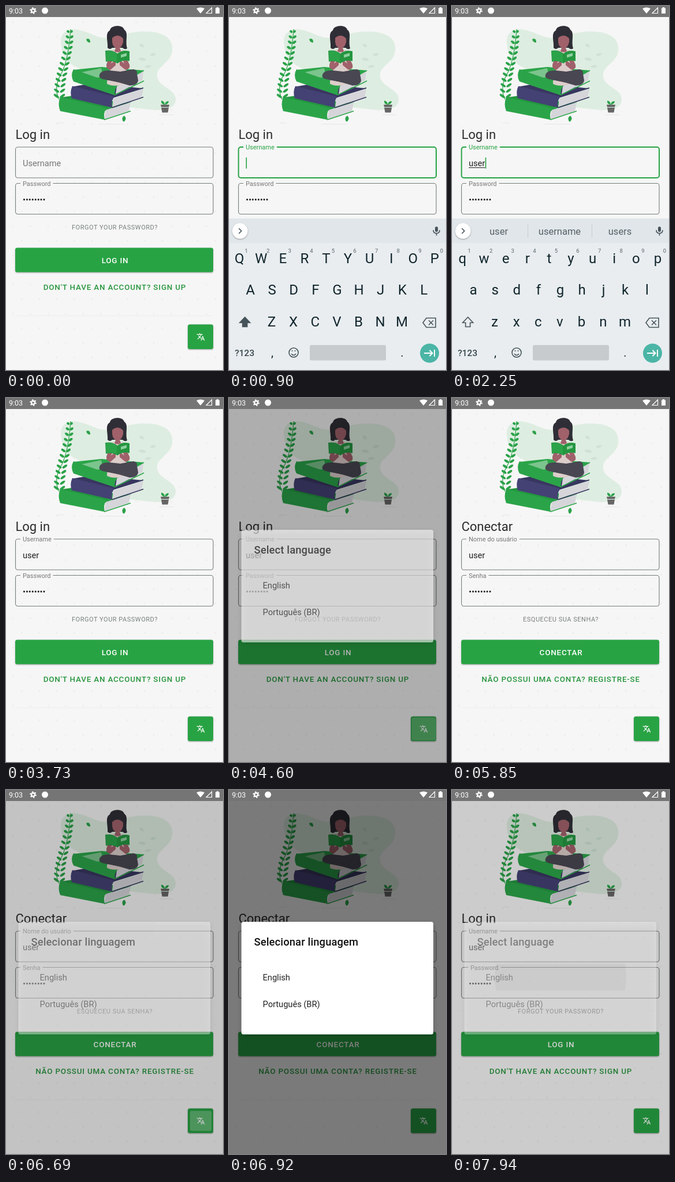
An HTML page that plays this animation: 376 by 627 pixels, repeating every 7990 ms.

```html
<!DOCTYPE html>
<html lang="en">
<head>
<meta charset="utf-8">
<title>Login and language</title>
<style>
html, body { margin: 0; width: 100%; height: 100%; overflow: hidden; background: #f6f6f6; }
svg { display: block; width: 100%; height: 100%; }
text { font-family: Roboto, "Noto Sans", sans-serif; white-space: pre; }
.center { text-anchor: middle; }
.body { font-size: 14.63px; fill: #222; }
.label { fill: #777; }
.button { font-size: 13.4px; font-weight: 500; letter-spacing: .82px; text-anchor: middle; }
.key { font-size: 24px; fill: #10252c; text-anchor: middle; }
.digit { font-size: 9.5px; fill: #59656a; text-anchor: middle; }
.hint { font-size: 16.5px; fill: #546066; text-anchor: middle; }
.line { fill: none; stroke: #46545a; stroke-width: 1.6; }
.shadow { filter: drop-shadow(0 1px 1.2px #0005); }
#shade { filter: blur(5px); }
</style>
</head>
<body>
<svg viewBox="0 0 376 627">
  <defs>
    <pattern id="dots" width="61" height="50.2" patternUnits="userSpaceOnUse">
      <path d="M11 9h2v2h-2zM41.500 9h2v2h-2zM26 34h2v2h-2zM56.500 34h2v2h-2z" fill="#e8e8e8"/>
    </pattern>
    <clipPath id="rowClip"><rect id="rowBox" x="22" width="332" height="46"/></clipPath>
  </defs>

  <rect width="376" height="627" fill="#f6f6f6"/>
  <rect y="19" width="376" height="608" fill="url(#dots)"/>

  <g id="art">
    <path fill="#deede1" d="M95 62C94 46 108 37 125 41C150 46 158 58 184 54C205 51 212 44 240 44C276 44 293 58 287 82C282 100 259 104 262 122C266 142 296 142 294 163C292 179 268 181 245 178L130 165C145 135 145 118 124 106C104 97 96 84 95 62Z"/>
    <path fill="#cfe2d3" d="M229 91q6-5 14 1q-5 6-14-1zM249 85q4-6 11-3q-3 6-11 3zM231 66q6-4 8 5q-6 1-8-5zM240 105q6-6 12-2q-4 6-12 2z"/>
    <g id="fern" fill="#2ba249"><path d="M112 40Q108 95 95 118T92 161" fill="none" stroke="#2ba249" stroke-width="1.2"/></g>
    <path fill="#2ba249" d="M139 57q7-3 7 6q-6 0-7-6zM203 199q-4-7 2-10q5 4 0 10z"/>
    <path fill="#e6e6e6" d="M88 201h12v1h-12zM160 203h45v1h-45zM265 187h25v1h-25z"/>

    <path fill="#249640" d="M92 158L112 155L216 168L174 181Z"/>
    <path fill="#d5d5da" d="M173 179L216 166L213 181L170 195Z"/>
    <path fill="#2ba449" d="M94 157L174 176Q168 185 171 196L94 181Q89 169 94 157Z"/>
    <path fill="none" stroke="#2ba449" stroke-width="1.6" d="M170 196L216 181M173 177L216 165"/>

    <path fill="#393660" d="M115 139L150 133L238 142L186 158Z"/>
    <path fill="#d5d5da" d="M186 159L238 143L235 157L184 174Z"/>
    <path fill="#444174" d="M115 138L188 156Q181 164 184 175L114 159Q110 148 115 138Z"/>
    <path fill="none" stroke="#393660" stroke-width="1.6" d="M184 175L238 157M186 157L238 141"/>

    <path fill="#2ba449" d="M117 110L165 105L239 111L192 137Z"/>
    <path fill="#7cc48d" d="M127 115l38-8 3 15-14 2z"/>
    <path fill="#d5d5da" d="M192 138L238 113L236 128L190 152Z"/>
    <path fill="#2ba449" d="M117 109L194 136Q187 144 189 154L117 130Q111 119 117 109Z"/>
    <path fill="none" stroke="#2ba449" stroke-width="1.6" d="M189 153L239 129M192 137L239 111"/>

    <path fill="#2f2e36" d="M176 72C177 60 171 47 180 42C181 33 202 31 205 41C213 46 206 60 210 73Q206 76 202 72H184Q180 76 176 72Z"/>
    <path fill="#dccdca" d="M180 77Q193 72 206 77L209 108L207 122L203 135Q186 140 175 134L180 118Z"/>
    <path fill="#a0616a" d="M184 53Q193 47 203 53V62Q201 70 197 72L199 78Q193 81 188 78L190 72Q185 70 184 62Z"/>
    <path fill="#2f2e36" d="M182 57Q187 45 194 47Q202 45 204 57Q198 50 193 51Q187 51 182 57Z"/>
    <path fill="#a0616a" d="M179 86L174 101Q173 109 181 110L190 102V93L182 99L187 88ZM207 86L214 101Q216 109 207 110L197 102V93L205 99L200 88Z"/>
    <path fill="#249640" d="M172 77Q184 75 193 82Q202 75 214 78V95Q202 92 193 99Q184 93 173 96Z"/>
    <path fill="#2ba449" d="M173 78Q184 76 192 83V97Q184 92 174 95Z"/>
    <path fill="#8ed09e" d="M199 84l10-3v5l-10 3z"/>
    <path fill="#484752" d="M162 118Q165 110 180 111L198 113L221 109Q228 110 227 117L229 128Q228 137 214 137L197 132L168 126Q160 124 162 118Z"/>
    <path fill="#dccdca" d="M175 128l16 3 8 4-7 2-17-3z"/>

    <path fill="#666" d="M268 170h15l-1 4h-13zM269 175h13l-1.500 8.500h-10z"/>
    <path fill="#2ba249" d="M275 170q-7-1-6-7q6 1 6 7zM275 170q1-7 7-6q0 5-7 6z"/>
  </g>

  <text id="heading" x="16.4" y="229" font-size="22" fill="#2b2b2b"></text>
  <g id="form"></g>
  <text id="forgot" class="center" x="188.500" y="385" font-size="11" letter-spacing=".52" fill="#77807a"></text>
  <rect class="shadow" x="16" y="416.500" width="343" height="42" rx="3.500" fill="#28a344"/>
  <text id="login" class="button" x="189" y="443" fill="#fff"></text>
  <text id="signup" class="button" x="188.500" y="488.500" fill="#28963f"></text>
  <path d="M16 533.500H359" stroke="#ededed"/>
  <rect class="shadow" x="315" y="548.500" width="44" height="42.500" rx="3.500" fill="#28a344"/>
  <rect id="fabRipple" rx="3" fill="#fff"/>
  <path fill="#fff" transform="translate(330 562.500) scale(.62)" d="M12.87 15.07l-2.54-2.51.03-.03c1.74-1.94 2.98-4.17 3.71-6.53H17V4h-7V2H8v2H1v1.99h11.17C11.5 7.92 10.44 9.75 9 11.35 8.07 10.32 7.3 9.19 6.69 8h-2c.73 1.63 1.73 3.17 2.98 4.56l-5.09 5.02L4 19l5-5 3.11 3.11.76-2.04zM18.5 10h-2L12 22h2l1.12-3h4.75L21 22h2l-4.5-12zm-2.62 7l1.62-4.33L19.12 17h-3.24z"/>

  <g id="keyboard">
    <rect y="366" width="376" height="261" fill="#e9edf0"/>
    <rect y="366" width="376" height="42" fill="#e1e6ea"/>
    <circle class="shadow" cx="19" cy="387.500" r="13.500" fill="#fff"/>
    <path class="line" d="M17 383l4.500 4.500-4.500 4.500"/>
    <path id="hintLines" d="M131.500 376v23M242.500 376v23" stroke="#c5ccd0"/>
    <rect x="357" y="380" width="5" height="9" rx="2.500" fill="#46545a"/>
    <path class="line" d="M354 386q0 5.500 5.500 5.500t5.500-5.500M359.500 391.500v4"/>
    <path id="shift" class="line" d="M27.500 536l-9 9.500h5v7h8v-7h5z"/>
    <path class="line" d="M336 545.500l6-8h16v16h-16zM346 541.500l8 8M354 541.500l-8 8"/>
    <text x="27" y="603" class="center" font-size="15.500" font-weight="500" fill="#36464d">?123</text>
    <text class="key" x="75" y="604" style="font-size:20px">,</text>
    <text class="key" x="300" y="604" style="font-size:20px">.</text>
    <circle class="line" cx="112" cy="597" r="8"/>
    <path class="line" d="M108 599q4 5 8 0M108.500 594h2M113.500 594h2"/>
    <rect x="140" y="584" width="132" height="26.500" rx="3" fill="#c7cbce"/>
    <circle cx="347.500" cy="598" r="16.500" fill="#4bb5a6"/>
    <path d="M338 598h14M347.500 593l5 5-5 5M356 592v12" fill="none" stroke="#fff" stroke-width="2"/>
  </g>

  <rect id="scrim" y="19" width="376" height="608"/>
  <rect id="shade" x="22" y="230" width="332" height="192" rx="4"/>
  <g id="dialog">
    <rect x="21.500" y="227" width="332.500" height="194" rx="3.500" fill="#fff"/>
    <circle id="rowRipple" cx="188" fill="#cacaca" clip-path="url(#rowClip)"/>
    <text id="title" x="43.500" y="268" font-size="18.300" font-weight="500" letter-spacing=".18" fill="#111"></text>
    <text class="body" x="58.500" y="328">English</text>
    <text class="body" x="58.500" y="374">Português (BR)</text>
  </g>

  <rect width="376" height="19" fill="#757575"/>
  <g fill="#fff">
    <text x="5" y="13" font-size="12.500">9:03</text>
    <circle cx="47" cy="8" r="3" fill="none" stroke="#fff" stroke-width="2.400"/>
    <circle cx="47" cy="8" r="4.900" fill="none" stroke="#fff" stroke-width="1.800" stroke-dasharray="2.300 2.830"/>
    <circle cx="67.500" cy="8" r="5.500"/>
    <path d="M330 4.500Q337 .5 344 4.500L337 13Z"/>
    <path d="M347 12.500L356.500 3V12.500Z" fill="none" stroke="#fff" stroke-width="1.200"/>
    <path d="M363 3.500h2V2h3v1.500h2V13h-7z"/>
  </g>
</svg>
<script>
const LOOP = 7990;
const FLOAT_FONT = 10.97, BODY_FONT = 14.63;
const WORDS = {
  en: { heading: "Log in", user: "Username", pass: "Password", forgot: "FORGOT YOUR PASSWORD?",
        login: "LOG IN", signup: "DON'T HAVE AN ACCOUNT? SIGN UP", title: "Select language" },
  pt: { heading: "Conectar", user: "Nome do usuário", pass: "Senha", forgot: "ESQUECEU SUA SENHA?",
        login: "CONECTAR", signup: "NÃO POSSUI UMA CONTA? REGISTRE-SE", title: "Selecionar linguagem" }
};
const TYPING = [
  [1870, "u", ["u", "up", "us"]],
  [1920, "us", ["us", "use", "USA"]],
  [2020, "use", ["use", "used", "user"]],
  [2250, "user", ["user", "username", "users"]]
];
const DIALOGS = [
  { tap: 4470, close: 5670, row: 345 },
  { tap: 6590, close: 7890, row: 299.5 }
];

const $ = id => document.getElementById(id);
const clamp = x => Math.max(0, Math.min(1, x));
const progress = (t, start, length) => clamp((t - start) / length);
const easeOut = x => 1 - (1 - x) ** 2;
const lerp = (a, b, p) => a + (b - a) * p;
const set = (node, attrs) => { for (const k in attrs) node.setAttribute(k, attrs[k]); };
function add(parent, tag, attrs, content = "") {
  const node = document.createElementNS("http://www.w3.org/2000/svg", tag);
  set(node, attrs);
  node.textContent = content;
  return parent.appendChild(node);
}

const LEAF_PAIRS = 13;
for (let i = 0; i < LEAF_PAIRS; i++) {
  const p = i / (LEAF_PAIRS - 1), y = lerp(45, 156, p);
  const x = 101.5 + 9 * Math.cos(Math.PI * p), size = lerp(2.8, 5.3, Math.sqrt(p));
  for (const side of [-1, 1])
    add($("fern"), "ellipse", { rx: size, ry: 2.1,
      transform: `translate(${x + side * size} ${y - 1}) rotate(${side * -35})` });
}

function makeField(top) {
  return {
    top,
    box: add($("form"), "rect", { x: 16.5, y: top, width: 342.5, height: 53, rx: 4, fill: "none" }),
    gap: add($("form"), "rect", { y: top - 3, height: 6, fill: "#f6f6f6" }),
    label: add($("form"), "text", { class: "label" }),
    value: add($("form"), "text", { class: "body", x: 29, y: top + 33 })
  };
}
function drawField(field, text, float, focused, shift = 0) {
  field.label.textContent = text;
  set(field.label, { x: 29 + shift, y: lerp(field.top + 33, field.top + 4.2, float),
    "font-size": lerp(BODY_FONT, FLOAT_FONT, float), style: focused ? "fill:#28a344" : "" });
  set(field.box, { stroke: focused ? "#28a344" : "#747f78", "stroke-width": focused ? 2 : 1.1 });
  set(field.gap, { x: 25 + shift, width: float * (field.label.getComputedTextLength() + 8) });
}
const userField = makeField(243), passField = makeField(305.5);
passField.value.textContent = "••••••••";
const underline = add($("form"), "path", { stroke: "#222" });
const caret = add($("form"), "rect", { y: 261, width: 1.6, height: 19, fill: "#28a344" });

const keys = [];
[["qwertyuiop", 18, 443], ["asdfghjkl", 37, 497], ["zxcvbnm", 74, 552]].forEach(([row, left, y], r) =>
  [...row].forEach((letter, i) => {
    const x = left + i * 37.6;
    keys.push([add($("keyboard"), "text", { class: "key", x, y }), letter]);
    if (r === 0) add($("keyboard"), "text", { class: "digit", x: x + 12, y: 425 }, (i + 1) % 10);
  }));
const hints = [81, 186.5, 291].map(x => add($("keyboard"), "text", { class: "hint", x, y: 394 }));

function drawForm(t, words) {
  for (const id of ["heading", "forgot", "login", "signup", "title"]) $(id).textContent = words[id];
  const focused = t >= 620 && t < 3400;
  const typed = TYPING.filter(step => t >= step[0]).pop();
  drawField(userField, words.user, easeOut(progress(t, 620, 150)), focused);
  drawField(passField, words.pass, 1, false, t >= 7890 ? 3 : 0);
  userField.value.textContent = typed ? typed[1] : "";

  const end = 29 + (typed ? userField.value.getComputedTextLength() : 0);
  const caretOn = focused && !(t >= 1410 && t < 1870) && t < 2890;
  set(caret, { x: end + 0.3, opacity: +caretOn });
  set(underline, { d: `M29 278.5H${end}`, opacity: +focused });

  const shown = easeOut(progress(t, 670, 230)) * (1 - progress(t, 3430, 270) ** 2);
  set($("keyboard"), { transform: `translate(0 ${261 * (1 - shown)})` });
  set($("dots"), { patternTransform: `translate(0 18) scale(${t > 760 && t < 3480 ? 0.57 : 1})` });
  for (const [node, letter] of keys) node.textContent = typed ? letter : letter.toUpperCase();
  set($("shift"), { style: typed ? "" : "fill:#46545a" });
  set($("hintLines"), { opacity: typed ? 1 : 0 });
  hints.forEach((node, i) => node.textContent = typed ? typed[2][i] : "");
}

function drawDialog(t) {
  const { tap, close, row } = DIALOGS[t < 6000 ? 0 : 1];
  const alpha = easeOut(progress(t, tap + 45, 240)) * (1 - progress(t, close, 170)) ** 3;
  set($("scrim"), { opacity: alpha * 0.5 });
  set($("shade"), { opacity: alpha * 0.2 });
  set($("dialog"), { opacity: alpha });

  const held = t - close;
  set($("rowBox"), { y: row });
  set($("rowRipple"), { cy: row + 23, r: 87 + 0.53 * Math.max(0, held),
    opacity: held < 0 ? 0 : lerp(1, 0.45, clamp(held / 50)) });

  const pressed = t - tap, half = Math.min(22, 10 + 0.085 * pressed);
  set($("fabRipple"), { x: 337.5 - half, y: 570 - half * 0.93,
    width: Math.max(0, half * 2), height: Math.max(0, half * 1.86),
    opacity: pressed < 0 ? 0 : 0.26 * (1 - progress(pressed, 110, 200)) });
}

function draw() {
  const t = performance.now() % LOOP;
  drawForm(t, t >= 5670 && t < 7890 ? WORDS.pt : WORDS.en);
  drawDialog(t);
  requestAnimationFrame(draw);
}
draw();
</script>
</body>
</html>
```
